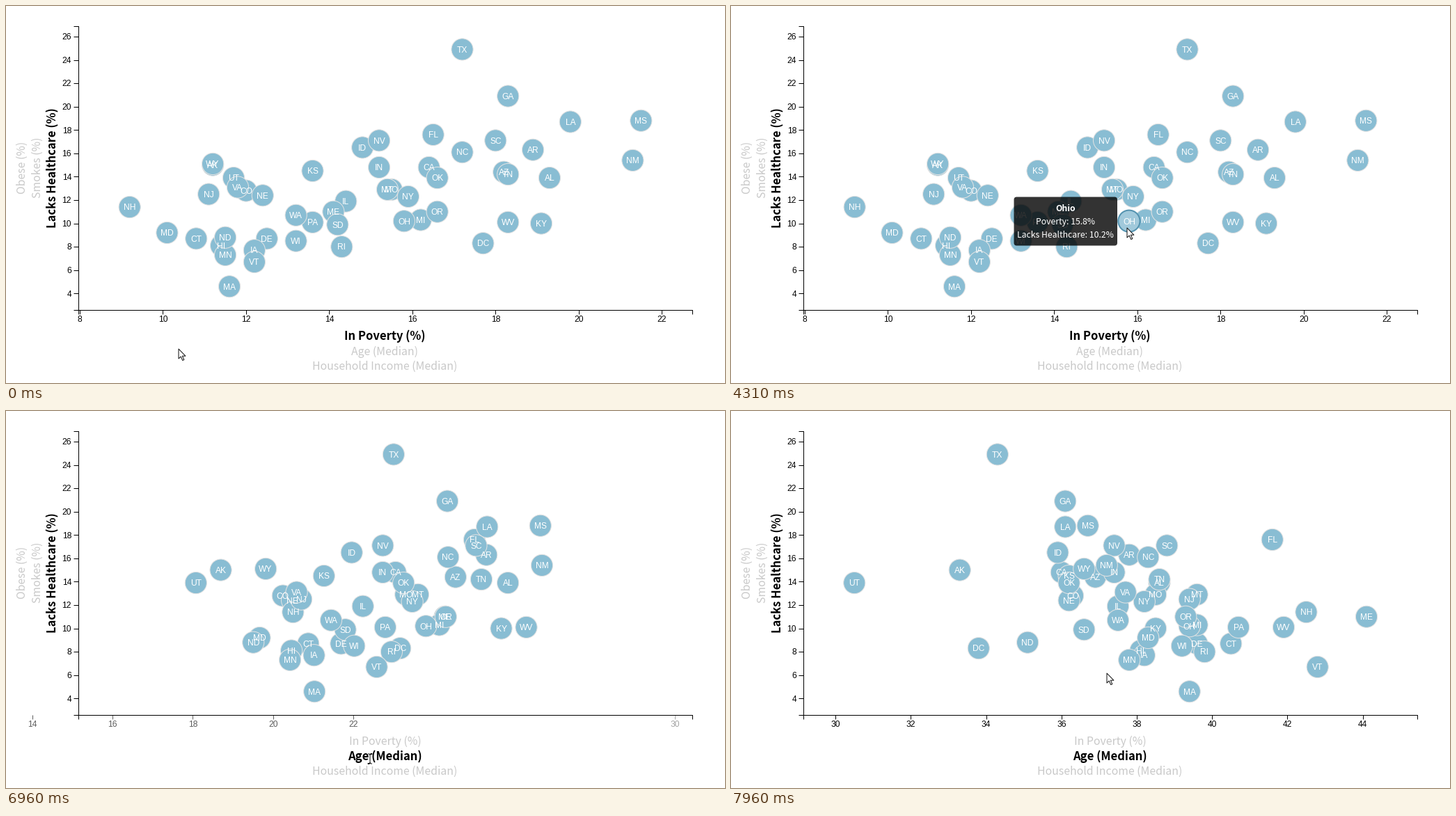
A matplotlib script that plays this animation: 1033x542 px, repeating every 8000 ms.

```python
import numpy as np
import matplotlib.pyplot as plt
from matplotlib.animation import FuncAnimation
from matplotlib.patches import FancyBboxPatch, Polygon

W, H, DPI = 1033, 542, 64
PT = 72 / DPI
STEP, LOOP = 40, 8000
SANS, HUMANIST = "Liberation Sans", "Noto Sans CJK JP"
FILL, EDGE, FAINT, HOVER = "#89bdd3", "#e3e3e3", "#c9c9c9", "#7a7a7a"

STATES = """AL AK AZ AR CA CO CT DE DC FL GA HI ID IL IN IA KS KY LA ME MD MA MI
MN MS MO MT NE NV NH NJ NM NY NC ND OH OK OR PA RI SC SD TN TX UT VT VA WA WV WI WY""".split()
POVERTY = np.array([
    19.3, 11.2, 18.2, 18.9, 16.4, 12.0, 10.8, 12.5, 17.7, 16.5,
    18.3, 11.4, 14.8, 14.4, 15.2, 12.2, 13.6, 19.1, 19.8, 14.1,
    10.1, 11.6, 16.2, 11.5, 21.5, 15.5, 15.4, 12.4, 15.2, 9.2,
    11.1, 21.3, 15.9, 17.2, 11.5, 15.8, 16.6, 16.6, 13.6, 14.3,
    18.0, 14.2, 18.3, 17.2, 11.7, 12.2, 11.8, 13.2, 18.3, 13.2, 11.2])
AGE = np.array([
    38.6, 33.3, 36.9, 37.8, 36.0, 36.3, 40.5, 39.6, 33.8, 41.6,
    36.1, 38.1, 35.9, 37.5, 37.4, 38.2, 36.2, 38.5, 36.1, 44.1,
    38.3, 39.4, 39.6, 37.8, 36.7, 38.5, 39.6, 36.2, 37.4, 42.5,
    39.4, 37.2, 38.2, 38.3, 35.1, 39.4, 36.2, 39.3, 40.7, 39.8,
    38.8, 36.6, 38.6, 34.3, 30.5, 42.8, 37.7, 37.5, 41.9, 39.2, 36.6])
HEALTH = np.array([
    13.9, 15.0, 14.4, 16.3, 14.8, 12.8, 8.7, 8.7, 8.3, 17.6,
    20.9, 8.1, 16.5, 11.9, 14.8, 7.7, 14.5, 10.0, 18.7, 11.0,
    9.2, 4.6, 10.3, 7.3, 18.8, 12.9, 12.9, 12.4, 17.1, 11.4,
    12.5, 15.4, 12.3, 16.1, 8.8, 10.2, 13.9, 11.0, 10.1, 8.0,
    17.1, 9.9, 14.2, 24.9, 13.9, 6.7, 13.1, 10.7, 10.1, 8.5, 15.1])
OHIO = STATES.index("OH")

# The screen refreshes only in short bursts: start, end, number of updates
BURSTS = [(820, 1590, 11), (1670, 2450, 11), (2520, 2600, 2), (4310, 5080, 11),
          (5170, 5930, 11), (6010, 6330, 5), (6480, 7260, 11), (7340, 7960, 9)]
UPDATES = np.concatenate([[0]] + [np.linspace(*b) for b in BURSTS])
CLICK, MOVE_START, MOVE_TIME = 6480, 6505, 987

# Pointer path: time, x, y
PATH = np.array([
    (780, 248, 493), (980, 285, 481), (1240, 380, 440), (1513, 464, 402),
    (1590, 475, 391), (2000, 520, 352), (2450, 565, 318), (2600, 569, 319),
    (4310, 569, 319), (4600, 571, 345), (5000, 579, 420), (5080, 580, 430),
    (5170, 579, 434), (5500, 553, 465), (5800, 523, 489), (5930, 523, 489),
    (6330, 523, 500), (7340, 523, 500), (7500, 525, 480), (7800, 535, 405),
    (7960, 540, 377)])

ARROW = [(0, 0), (0, 14), (3.2, 11), (5.7, 16.5), (7.8, 15.6), (5.4, 10.2), (9.9, 10.2)]
HAND = [(-1.7, 1), (-.8, 0), (.8, 0), (1.7, 1), (1.7, 6.5), (3, 6), (4.6, 7), (6, 6.8),
        (7, 7.8), (8.2, 8), (9, 9.5), (9, 14), (7.5, 17), (7.3, 20), (-2.2, 20),
        (-2.5, 18), (-6.5, 11.5), (-6.2, 10), (-4.5, 10), (-1.7, 12.8)]
BEAM = [(-3, -7), (-1, -7), (0, -6), (1, -7), (3, -7), (1, -7), (0, -6), (0, 6),
        (-1, 7), (-3, 7), (-1, 7), (0, 6), (1, 7), (3, 7)]


def x_poverty(v):
    return 106 + 59.73 * (v - 8)


def x_age(v):
    return 150.2 + 54.1 * (v - 30)


def y_health(v):
    return 413.3 - 16.79 * (v - 4)


def ease(t):
    t = min(max(t, 0), 1)
    return 4 * t ** 3 if t < .5 else 1 - 4 * (1 - t) ** 3


fig = plt.figure(figsize=(W / DPI, H / DPI), dpi=DPI, facecolor="white")
ax = fig.add_axes([0, 0, 1, 1])
ax.set_xlim(0, W)
ax.set_ylim(H, 0)
ax.axis("off")


def write(x, y, text, size, color="black", font=SANS, **kw):
    kw = {"ha": "center", "va": "baseline", **kw}
    return ax.text(x, y, text, fontsize=size * PT, color=color, family=font, **kw)


def line(xs, ys, **kw):
    return ax.plot(xs, ys, color="black", lw=PT, solid_capstyle="butt", **kw)[0]


def title(x, y, text, active, **kw):
    size, color, weight = (16.6, "black", "bold") if active else (15.8, FAINT, "light")
    return write(x, y, text, size, color, HUMANIST, weight=weight, **kw)


# Axes
line([97, 104, 104, 97], [28.5, 28.5, 437, 437])
line([104, 104, 986, 986], [443, 437, 437, 443])
for v in range(4, 27, 2):
    line([97, 104], [y_health(v)] * 2)
    write(94, y_health(v) + 4.3, str(v), 12, ha="right")

ticks = []
for v in [*range(8, 23, 2), *range(30, 45, 2)]:
    ticks.append((v, line([0, 0], [437, 443]), write(0, 454.3, str(v), 12)))

# Axis titles
side = dict(rotation=90, rotation_mode="anchor")
title(72, 232.5, "Lacks Healthcare (%)", True, **side)
title(49.5, 232.5, "Smokes (%)", False, **side)
title(28, 232.5, "Obese (%)", False, **side)
title(544.5, 523, "Household Income (Median)", False)
choices = []
for base, text in ((480, "In Poverty (%)"), (501.5, "Age (Median)")):
    choices.append((base, title(544.5, base, text, True), title(544.5, base, text, False)))

# Bubbles
ys = y_health(HEALTH)
dots = ax.scatter(x_poverty(POVERTY), ys, s=(31.2 * PT) ** 2, zorder=3)
names = [write(0, y + 4.3, s, 12, "white", zorder=4) for s, y in zip(STATES, ys)]

# Tooltip
tip = [ax.add_patch(FancyBboxPatch((406.5, 274.5), 148.5, 70, fc=(0, 0, 0, .8), ec="none",
                                   boxstyle="round,pad=0,rounding_size=4", zorder=6))]
for y, text, weight in ((295, "Ohio", "bold"), (314, "Poverty: 15.8%", "normal"),
                        (333, "Lacks Healthcare: 10.2%", "normal")):
    tip.append(write(480.8, y, text, 12.2, "white", HUMANIST, weight=weight, zorder=7))

# Pointers
pointers = {}
for kind, pts in (("arrow", ARROW), ("hand", HAND), ("beam", BEAM)):
    shape = Polygon(pts, closed=kind != "beam", fc="none" if kind == "beam" else "white",
                    ec="#111111", lw=PT, joinstyle="round", zorder=9)
    pointers[kind] = (ax.add_patch(shape), np.array(pts))


def show_ticks(e):
    for v, mark, text in ticks:
        x = (1 - e) * x_poverty(v) + e * x_age(v)
        alpha = 1 - e if v < 26 else e
        visible = alpha > 0 and -20 < x < W + 20
        mark.set_xdata([x, x])
        text.set_x(x)
        for part in (mark, text):
            part.set_alpha(alpha)
            part.set_visible(visible)


def update(frame):
    now = UPDATES[UPDATES <= frame * STEP + STEP - 2].max()
    e = ease((now - MOVE_START) / MOVE_TIME)
    px, py = (np.interp(now, PATH[:, 0], PATH[:, k]) for k in (1, 2))

    xs = (1 - e) * x_poverty(POVERTY) + e * x_age(AGE)
    dots.set_offsets(np.column_stack([xs, ys]))
    for name, x in zip(names, xs):
        name.set_x(x)
    show_ticks(e)

    over = now < CLICK and np.hypot(px - xs[OHIO], py - ys[OHIO]) < 15.6
    lit = [over and i == OHIO for i in range(len(STATES))]
    dots.set_facecolor(["#a1c9db" if on else FILL for on in lit])
    dots.set_edgecolor(["#5493b0" if on else EDGE for on in lit])
    dots.set_linewidth([2 * PT if on else PT for on in lit])
    for part in tip:
        part.set_visible(over)

    kind = "arrow"
    chosen = int(now >= CLICK)
    for i, (base, strong, faint) in enumerate(choices):
        inside = abs(px - 544.5) < 50 and base - 15 < py < base + 4.5
        strong.set_visible(i == chosen)
        faint.set_visible(i != chosen)
        faint.set_color(HOVER if inside else FAINT)
        if inside:
            kind = "beam" if i == chosen else "hand"

    for key, (shape, pts) in pointers.items():
        shape.set_visible(key == kind)
        shape.set_xy(pts + (px, py))
    return []


anim = FuncAnimation(fig, update, frames=LOOP // STEP, init_func=lambda: update(0),
                     interval=STEP, repeat=True, repeat_delay=0, blit=False)
plt.show()
```
